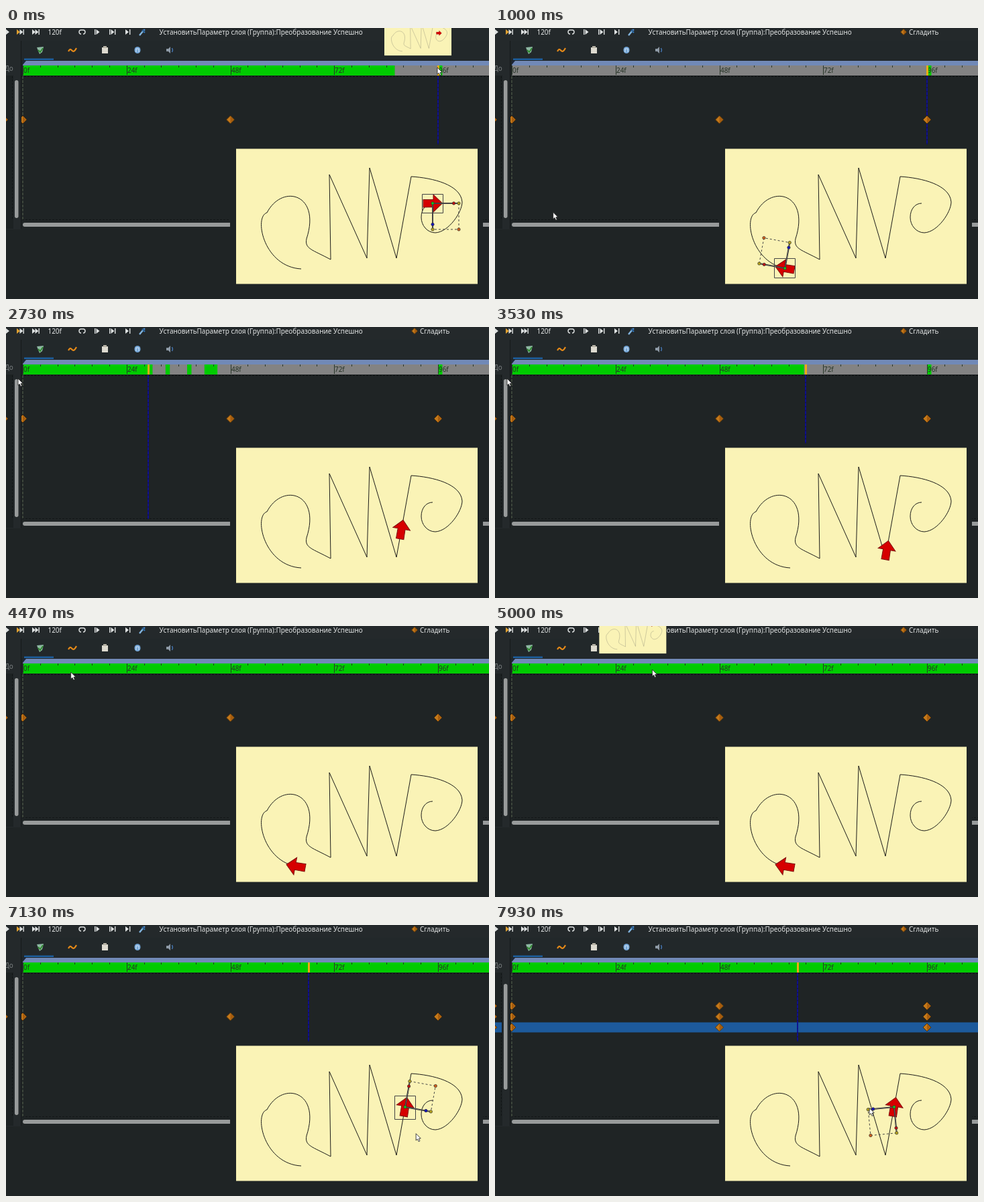
An HTML page with a canvas for the animation above (8 s loop, 720 by 405 pixels).

```html
<!DOCTYPE html>
<html lang="ru">
<head>
<meta charset="utf-8">
<style>
  html, body { margin: 0; width: 100%; height: 100%; overflow: hidden; background: #1f2425; }
  canvas { display: block; }
</style>
</head>
<body>
<canvas id="stage" width="720" height="405"></canvas>
<script>
const ctx = document.getElementById('stage').getContext('2d');
const LOOP = 8000, STEP = 200 / 3;
const RULER_X = 25, FRAME_W = 6.448, HALF = 48, LAST = 120;
const BG = '#1f2425', BAR = '#24292b', PAPER = '#faf3b6', LIGHT = '#dfe2e2', SCROLL = '#989b9b';
const EDITED = 900, SCRUB = 1400, PLAY = 2126, SEEK = 5400, SELECT = 6500, ROWS = 7450, TURN = 7600;

// A straight segment has one point, a Bezier segment three; each takes equal time.
const START = [440, 360];
const NODES = [
  [384, 357, 369, 282, 389, 276], [412, 232, 470, 248, 448, 315], [445, 330, 456, 331, 484, 346],
  [482, 219], [538, 344], [542, 209], [582, 344], [604, 222],
  [636, 224, 678, 234, 680, 260], [680, 275, 660, 305, 640, 306],
  [628, 306, 619, 295, 619, 283], [619, 271, 626, 262, 636, 262]
];
// Pointer stops: time, x, y
const STOPS = [
  [0, 643, 59], [800, -20, 380], [SCRUB, 300, 66], [PLAY, 9, 67], [2730, 18, 77], [3600, 18, 77],
  [4470, 97, 69], [SEEK, 338, 62], [5785, 448, 62], [6100, 448, 62],
  [SELECT, 595, 272], [7130, 611, 312], [TURN, 632, 278]
];

const clamp = (v, lo, hi) => Math.max(lo, Math.min(hi, v));
const frameX = f => RULER_X + f * FRAME_W;
const xFrame = x => (x - RULER_X) / FRAME_W;
const handleTurn = t => Math.max(0, t - TURN) * .0086;

function pointer(t) {
  if (t > TURN) {
    const a = handleTurn(t) + .18;
    return [595 + 37 * Math.cos(a), 270 + 37 * Math.sin(a)];
  }
  const i = STOPS.findIndex(s => s[0] > t), [t0, x0, y0] = STOPS[i - 1], [t1, x1, y1] = STOPS[i];
  const k = (t - t0) / (t1 - t0);
  return [x0 + (x1 - x0) * k, y0 + (y1 - y0) * k];
}
function playhead(t, mx) {
  if (t < SCRUB) return 2 * HALF;
  if (t < PLAY) return Math.round(xFrame(mx + 17));
  if (t < SEEK) return Math.min(LAST, Math.round((t - PLAY) * .048));
  return Math.min(66, Math.round(xFrame(mx + 3)));
}

function rect(x, y, w, h, color) { ctx.fillStyle = color; ctx.fillRect(x, y, w, h); }
function trace(points) {
  ctx.beginPath();
  points.forEach(p => ctx.lineTo(...p));
}
function stroke(color, width = 1, dash = []) {
  ctx.setLineDash(dash);
  ctx.strokeStyle = color;
  ctx.lineWidth = width;
  ctx.stroke();
  ctx.setLineDash([]);
}
function line(points, ...style) { trace(points); stroke(...style); }
function poly(points, fill, edge) {
  trace(points);
  ctx.closePath();
  ctx.fillStyle = fill;
  ctx.fill();
  if (edge) stroke(edge);
}
function pill(x, y, w, h, color) {
  ctx.beginPath();
  ctx.roundRect(x, y, w, h, Math.min(w, h) / 2);
  ctx.fillStyle = color;
  ctx.fill();
}
function dot([x, y], color, r = 2.2) {
  ctx.beginPath();
  ctx.arc(x, y, r, 0, 7);
  ctx.fillStyle = color;
  ctx.fill();
  stroke('#333', .7);
}
function text(s, x, y, color = '#e4e6e6') {
  ctx.font = '9.93px "Noto Sans", sans-serif';
  ctx.fillStyle = color;
  ctx.fillText(s, x, y);
}
function diamond(x, y, r = 6) {
  poly([[x, y - r], [x + r, y], [x, y + r], [x - r, y]], '#c4791a', '#50300a');
  poly([[x, y - r + 1], [x + r - 1, y], [x, y + r - 1]], '#a65c0e');
}

function pathPoint(amount) {
  const s = Math.min(amount * NODES.length, NODES.length - 1e-4);
  const i = Math.floor(s), u = s - i, v = 1 - u;
  const a = i ? NODES[i - 1].slice(-2) : START, n = NODES[i], b = n.slice(-2);
  const axis = k => {
    if (n.length === 2) return [a[k] + (b[k] - a[k]) * u, b[k] - a[k]];
    const c = n[k], d = n[k + 2];
    return [v * v * v * a[k] + 3 * v * v * u * c + 3 * v * u * u * d + u * u * u * b[k],
      v * v * (c - a[k]) + 2 * v * u * (d - c) + u * u * (b[k] - d)];
  };
  const [x, dx] = axis(0), [y, dy] = axis(1);
  return { x, y, angle: Math.atan2(dy, dx) };
}
// The arrow runs to the path's end by frame 48 and, once edited, back again by frame 96.
function arrowPose(frame, t) {
  const u = t < EDITED ? Math.min(1, frame / HALF) : clamp(1 - Math.abs(frame / HALF - 1), 0, 1);
  return pathPoint(clamp(u + .008 * Math.sin(Math.PI * u * u), .004, 1));
}
function drawPaper(pose, ink) {
  rect(343, 180.5, 360, 202, PAPER);
  ctx.beginPath();
  ctx.moveTo(...START);
  NODES.forEach(n => n.length === 2 ? ctx.lineTo(...n) : ctx.bezierCurveTo(...n));
  stroke(ink, .95);
  ctx.save();
  ctx.translate(pose.x, pose.y);
  ctx.rotate(pose.angle);
  poly([[14.5, 0], [1, 13], [1, 5.5], [-14, 6], [-14, -5.5], [1, -5.5], [1, -13]], '#d60000', '#7d1010');
  ctx.restore();
}
function drawHandles({ x, y, angle }, turn, boxed) {
  if (boxed) {
    const h = 28 + 7 * Math.abs(Math.sin(angle));
    ctx.beginPath();
    ctx.rect(Math.round(x - 16) + .5, Math.round(y - h / 2) + .5, 31, Math.round(h));
    stroke('#444');
  }
  const c = Math.cos(angle + turn), s = Math.sin(angle + turn);
  const at = (p, q) => [x + c * p - s * q, y + s * p + c * q];
  line([at(39, 0), at(39, 39), at(0, 39)], '#444', 1, [3, 3]);
  for (const end of [at(39, 0), at(0, 39)]) {
    line([[x, y], end], '#222', 2);
    line([[x, y], end], '#888', .7);
    dot(end, '#b8a51c');
  }
  dot(at(39, 39), '#d2601a');
  dot(at(31.5, 0), '#c01010');
  dot(at(0, 31.5), '#1515c0');
  dot([x, y], '#18c818');
}

function drawToolbar() {
  rect(0, 0, 720, 19, BAR);
  rect(0, 19, 720, 29, '#22282a');
  const play = (x, color = LIGHT) => poly([[x, 2], [x + 5, 6], [x, 10]], color);
  const bar = x => rect(x, 2, 1.4, 8, LIGHT);
  play(0);
  for (const x of [16, 39]) { play(x, x < 20 ? '#e0a030' : LIGHT); play(x + 4.5); bar(x + 9.5); }
  text('120f', 62.5, 10);
  ctx.beginPath();
  ctx.roundRect(109, 3, 9, 6, 3);
  stroke(LIGHT, 1.4);
  rect(112, 8, 3, 2, BAR);
  [134.5, 156.5, 178].forEach(x => play(x));
  [132, 154, 162, 184].forEach(bar);
  line([[199, 11], [204, 5]], '#83b5df', 2.4);
  line([[203, 3], [207, 7]], '#2d75bb', 2);
  dot([206, 3], '#3d86ce', 1.8);
  text('УстановитьПараметр слоя (Группа):Преобразование Успешно', 228.5, 10);
  diamond(609, 6, 4.5);
  text('Сгладить', 617, 10);

  rect(27, 45.5, 44, 2.5, '#1d5f9f');
  poly([[46, 29], [56, 28], [54, 36], [50, 39]], '#8fb9a4');
  line([[48, 33], [51, 36], [55, 30]], '#2f8a2f', 1.8);
  ctx.beginPath();
  ctx.moveTo(93, 35);
  ctx.bezierCurveTo(98, 25, 98, 43, 105, 30);
  stroke('#e68a18', 2.2);
  rect(143, 29, 9, 9, '#dedbd0');
  rect(145, 27, 5, 3, '#b5b1a4');
  pill(191.5, 28, 9, 10, '#73a5d6');
  line([[194, 36], [194, 31], [198, 31], [198, 36]], '#dbe9f6');
  poly([[239, 31], [242, 31], [245, 28], [245, 38], [242, 35], [239, 35]], '#8e9aa6');
  line([[247.5, 30], [248.5, 33], [247.5, 36]], '#4678b5', 1.4);
}

function drawRuler(t, head) {
  rect(25, 49, 695, 7, '#7189b7');
  rect(25, 56, 695, 15, '#838383');
  const green = (a, b) => { if (b > a) rect(frameX(a), 56, (b - a) * FRAME_W, 15, '#00cb00'); };
  const visited = (a, b) => green(t < PLAY ? Math.max(a, head) : a, b);
  green(96, 97);
  if (t < EDITED) green(0, 86);
  if (t >= SCRUB) {
    // Frames touched by the fast backward scrub, then the slow end of it.
    for (let i = 0; i < 6; i++) {
      const f = Math.round(16 + 4.35 * i);
      visited(f, f + 1);
    }
    visited(42, 45);
    visited(8, 14);
  }
  if (t > PLAY) green(0, Math.min(LAST, (t - PLAY) * .048));
  for (let f = 0; f < 108; f += 4) {
    const x = Math.round(frameX(f)) + .5, major = f % 24 === 0;
    line([[x, 56], [x, major ? 70 : 59]], '#293629');
    if (major) text(f + 'f', x + .5, 67, '#263326');
  }
  poly([[25, 49], [30, 49], [25, 55]], '#1c2638');
}

function drawTracks(t, head) {
  const expanded = t > ROWS, rows = expanded ? [121, 137, 153] : [137];
  line([[22, 72.5], [720, 72.5]], '#0d1010', 1, [3, 2]);
  rect(0, 19, 22, 282, BAR);
  rect(0, 71, 11, 229, '#1d2223');
  line([[22.5, 19], [22.5, 300]], '#15191a');
  line([[9.5, 72], [9.5, 286]], '#111516', 1, [3, 2]);
  text('До', -2, 64, '#7d8283');
  line([[24, 286.5], [720, 286.5]], '#121617', 1, [3, 2]);
  if (expanded) {
    rect(0, 145.5, 10, 15, '#1d5a9c');
    rect(24, 145.5, 696, 15, '#1d5a9c');
  }
  pill(13, expanded ? 88 : 78, 5.5, expanded ? 158 : 206, SCROLL);
  line([[25, 72], [25, 287]], '#59624f', 1, [4, 2]);
  if (head < 108) {
    const x = Math.round(frameX(head));
    line([[x, 72], [x, 287]], '#0b0b78', 1.6);
    line([[x, 72], [x, 287]], '#1010a8', 1.2, [4, 2]);
    rect(x - 1, 56, 3, 15, '#f0ac12');
  }
  for (const y of rows) {
    diamond(-3, y);
    ctx.save();
    ctx.beginPath();
    ctx.rect(23, 73, 697, 215);
    ctx.clip();
    for (let i = 0; i < (t < EDITED ? 2 : 3); i++) diamond(frameX(i * HALF), y);
    ctx.restore();
  }
  pill(25, 291, 710, 6, SCROLL);
}

function drawCursor(x, y) {
  ctx.save();
  ctx.translate(x, y);
  ctx.scale(.85, .85);
  poly([[0, 0], [0, 12], [2.7, 9.6], [4.7, 14], [6.8, 13], [4.9, 8.8], [8.4, 8.5]], '#fff', '#222');
  ctx.restore();
}

function draw(t) {
  const [mx, my] = pointer(t);
  const head = playhead(t, mx);
  const lag = t >= SCRUB && t < PLAY ? 5.7 : 0;
  const pose = arrowPose(head + lag, t);
  rect(0, 0, 720, 405, BG);
  drawToolbar();
  drawRuler(t, head);
  drawTracks(t, head);
  rect(334, 174, 377, 231, BG);
  drawPaper(pose, '#111');
  if (t < SCRUB || t >= SELECT) drawHandles(pose, handleTurn(t), t < ROWS);
  if (t < 100 || (t > 4800 && t < SEEK)) {
    ctx.save();
    ctx.translate(mx - 79, -15);
    ctx.scale(1 / 3.6, 1 / 3.6);
    ctx.translate(-343, -180.5);
    drawPaper(arrowPose(xFrame(mx), t), '#555');
    ctx.restore();
  }
  drawCursor(mx, my);
}

const began = performance.now();
function tick() {
  const t = (performance.now() - began) % LOOP;
  draw(Math.floor((t + 5) / STEP) * STEP);
  requestAnimationFrame(tick);
}
tick();
</script>
</body>
</html>
```
